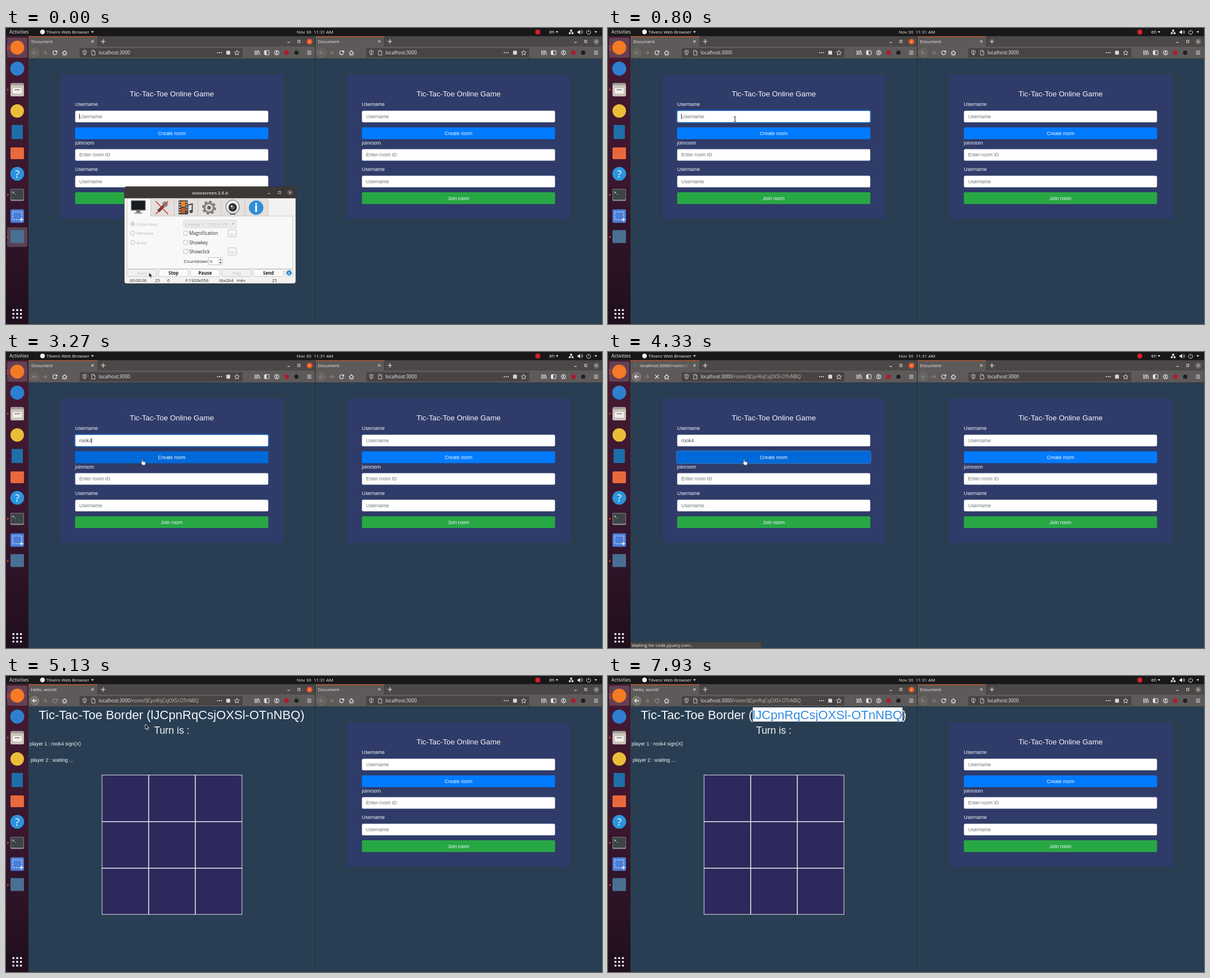
Recreate the animation shown at these times as an HTML page. Size 1061 by 528 pixels, loop 8000 ms.

```html
<!DOCTYPE html>
<html lang="en">
<head>
<meta charset="utf-8">
<title>Online game demo</title>
<style>
  html, body { margin: 0; width: 1061px; height: 528px; overflow: hidden; background: #293e52; }
  svg { display: block; }
  text { font-family: "Open Sans", "Noto Sans", sans-serif; white-space: pre; }
  .web { font-family: "Liberation Sans", Arial, sans-serif; }
  .mid { text-anchor: middle; }
  .bold { font-weight: 700; }
</style>
</head>
<body>
<svg id="stage" width="1061" height="528" viewBox="0 0 1061 528"></svg>
<script>
const LOOP = 8000;
const USER = 'rook4';
const ROOM = 'lJCpnRqCsjOXSl-OTnNBQ';
const HEAD = 'Tic-Tac-Toe Border (';
const PAGE = '#293e52', BAR = '#5d5a59', FG = '#f1f0ef';

// Drawing helpers
const rect = (x, y, w, h, fill, r = 0, more = '') =>
  `<rect x="${x}" y="${y}" width="${w}" height="${h}" rx="${r}" fill="${fill}" ${more}/>`;
const dot = (x, y, r, fill, more = '') => `<circle cx="${x}" cy="${y}" r="${r}" fill="${fill}" ${more}/>`;
const line = (d, color = FG, w = 1, fill = 'none') =>
  `<path d="${d}" stroke="${color}" stroke-width="${w}" fill="${fill}"/>`;
const shape = (d, fill = FG) => `<path d="${d}" fill="${fill}"/>`;
const text = (x, y, s, size, fill = FG, cls = '') =>
  `<text x="${x}" y="${y}" font-size="${size}" fill="${fill}" class="${cls}">${s}</text>`;
const group = (id, body, more = '') => `<g id="${id}" ${more}>${body}</g>`;
const cross = (x, y, r, color = FG, w = 1) =>
  line(`M${x - r} ${y - r}l${2 * r} ${2 * r}m0 ${-2 * r}l${-2 * r} ${2 * r}`, color, w);
const caretDown = (x, y, color = FG) => shape(`M${x - 2.4} ${y - 1.2}h4.8l-2.4 3z`, color);

function topBar() {
  return rect(0, 0, 1061, 14.5, '#191818')
    + text(6, 10.2, 'Activities', 8.4)
    + dot(65, 7, 4.2, FG)
    + text(72, 10.2, 'Tilvero Web Browser', 8)
    + caretDown(154, 7)
    + text(550, 10.2, 'Nov 30&#160; 11:31 AM', 8, FG, 'mid')
    + dot(946.7, 7.2, 4.6, '#d3202c')
    + text(967, 10.2, 'en', 8.2) + caretDown(981, 7)
    + rect(1004.5, 3, 3.2, 3, FG) + rect(1002, 8, 3.2, 3, FG) + rect(1007, 8, 3.2, 3, FG)
    + line('M1006 6v1.2M1003.6 8.3v-1.2h5v1.2', FG, .7)
    + shape('M1017.5 5.7h2l2.5-2.4v8l-2.5-2.4h-2z')
    + line('M1023.4 5a3 3 0 0 1 0 4.4M1025 3.6a5 5 0 0 1 0 7.2', FG, .8)
    + line('M1035.2 4.6a3.6 3.6 0 1 0 3.8 0M1037.1 3v4', FG, 1)
    + caretDown(1050, 7);
}

function dock() {
  const apps = [0, 1, 2].map(r => [0, 1, 2].map(c => dot(13.2 + c * 6.7, 503.2 + r * 6.7, 1.9, '#f4f0f2')).join('')).join('');
  const marks = [33, 38, 110, 297.5, 373].map(y => dot(3.2, y, 1.4, '#e95420')).join('');
  return rect(0, 14.5, 40, 513.5, 'url(#dockShade)')
    + rect(2, 17, 36, 36, '#ffffff', 3, 'opacity=".17"')
    + group('dockActive', rect(2, 355.5, 36, 35, '#ffffff', 3, 'opacity=".2"'))
    + dot(20, 35, 12.5, '#f57a25')
    + dot(20, 72.5, 12.5, '#2f7fd0')
    + rect(8, 98, 24, 24, '#a39d95', 3) + rect(8, 102, 24, 20, '#c9c4bc', 3)
    + rect(12, 107, 16, 10, '#f2f0ed', 1.5) + rect(15, 109, 10, 2.2, '#a39d95', 1)
    + dot(20, 148, 12, '#e9bd3a')
    + rect(10, 173, 20, 25, '#1d6fa8', 1)
    + rect(8, 213, 24, 21, '#e8693c', 2)
    + dot(20, 260, 12.3, '#2c94dc') + text(20, 267, '?', 19, '#ffffff', 'mid')
    + rect(8, 287, 24, 21.5, '#8e9090', 2) + rect(8.8, 287.8, 22.4, 18.5, '#3c4446', 1.5)
    + text(11, 296, '&gt;_', 7, '#ffffff', 'bold')
    + rect(8, 323.5, 24, 24, '#4a7fd8', 2.5)
    + '<rect x="12" y="328" width="16" height="14" fill="none" stroke="#fff" stroke-dasharray="2.4 1.8"/>'
    + line('M27.5 339v6M24.5 342h6', '#ffffff', 1.3)
    + rect(8, 360.5, 24, 23, '#496f93', 1)
    + marks + apps;
}

// Browser frame at the left; the right window is a shifted copy
function chrome(left) {
  const pre = left ? 'L' : 'R';
  const reload = line('M89.8 41.7a3.6 3.6 0 1 0 .8 3.2', FG, 1.2) + shape('M91.4 39.8v3.8h-3.8z');
  return rect(40, 14.5, 510.2, 19, '#4b4847')
    + rect(40, 14.5, 123, 19, BAR) + rect(40, 14.5, 123, 1.4, '#d95b2c')
    + line('M163.3 16v17', '#3a3837', .8)
    + rect(40, 33, 510.2, 21.5, BAR) + rect(40, 54, 510.2, .8, '#353b42')
    + group(pre + 'doc', text(45, 27, 'Document', 7.8))
    + cross(154, 24, 2.2) + line('M169 24h8M173 20v8', FG, 1.1)
    + line('M501 25.7h4.5', FG, 1) + '<rect x="519.5" y="22" width="4" height="4" fill="none" stroke="#f1f0ef" stroke-width=".9"/>'
    + dot(540.3, 24.3, 5.2, left ? '#e95420' : '#6d6a68') + cross(540.3, 24.3, 1.8, FG, .9)
    + group(pre + 'backOff', dot(51, 44, 8, '#656260', 'stroke="#75726f" stroke-width=".7"') + line('M55 44h-7.5M50.8 40.7l-3.3 3.3l3.3 3.3', '#8e8b89', 1.2))
    + line('M65 44h7.5M69.2 40.7l3.3 3.3l-3.3 3.3', '#8b8886', 1.2)
    + group(pre + 'reload', reload)
    + line('M100.2 44.4l4.2-4l4.2 4M101.6 43.6v4.4h5.6v-4.4M104.4 48v-2.6', FG, 1.1)
    + rect(131, 36, 290, 16.5, '#474443', 2)
    + line('M136.7 41l3.2-1.2l3.2 1.2c0 4-1 6-3.2 7.3c-2.2-1.3-3.2-3.3-3.2-7.3zM139.9 40v8', '#dad8d6', .9)
    + line('M152.6 40h3.7l2.2 2.2v6h-5.9zM156.2 40v2.3h2.2', '#dad8d6', .9)
    + text(165, 47.2, 'localhost:3000', 8.3)
    + [376.6, 380, 383.4].map(x => dot(x, 44, 1, FG)).join('')
    + rect(392.2, 40.6, 6.8, 6.8, '#dad8d6', 1)
    + line('M411 39.8l1.3 2.8l3 .4l-2.2 2.1l.6 3l-2.7-1.5l-2.7 1.5l.6-3l-2.2-2.1l3-.4z', FG, .9)
    + line('M443.2 40v8M445.7 40v8M448.2 40v8M449.6 40.3l2.4 7.6', FG, 1.1)
    + '<rect x="460" y="40.3" width="8.4" height="7.4" rx="1" fill="none" stroke="#f1f0ef"/>' + rect(460.6, 41, 3, 6, FG)
    + dot(482, 44, 4, 'none', 'stroke="#f1f0ef"') + dot(482, 42.9, 1.4, FG) + line('M479.5 46.6q2.5-2.4 5 0', FG, 1)
    + dot(499.5, 44, 4, '#b3182b')
    + dot(517, 44, 3.8, '#1f1e1e')
    + line('M536.2 41.2h7.4M536.2 44h7.4M536.2 46.8h7.4', FG, 1.1);
}

const field = (y, hint) =>
  rect(123.3, y + .3, 343.4, 20.4, '#ffffff', 2.2, 'stroke="#ced4da" stroke-width=".5"')
  + text(130.5, y + 13.3, hint, 8.84, '#6c757d', 'web');
const button = (y, label, fill) =>
  rect(123, y, 344, 21, fill, 2.2) + text(295, y + 13.5, label, 8.84, '#f5f8ff', 'web mid');
const label = (y, s) => text(123, y, s, 8.84, '#f4f6fa', 'web');

function form(hint) {
  return rect(97, 83, 396.5, 257.5, '#2f3b69')
    + text(295.2, 121.7, 'Tic-Tac-Toe Online Game', 13.26, '#f6f7fb', 'web mid')
    + label(139.2, 'Username') + field(147.4, hint)
    + button(177.2, 'Create room', '#007bff')
    + label(207.6, 'joinroom') + field(215.9, 'Enter room ID')
    + label(255.2, 'Username') + field(263.4, 'Username')
    + button(293, 'Join room', '#28a745');
}

function leftForm() {
  const typed = [...USER].map((_, i) =>
    group('typed' + (i + 1), text(130.5, 160.7, USER.slice(0, i + 1), 8.84, '#495057', 'web'))).join('');
  const ring = (id, y, color) =>
    group(id, `<rect x="122.3" y="${y}" width="345.4" height="22.4" rx="3" fill="none" stroke="${color}" stroke-width="1.9"/>`);
  return form('') + ring('inputRing', 146.7, '#1d62b4')
    + group('typed0', text(130.5, 160.7, 'Username', 8.84, '#6c757d', 'web')) + typed
    + group('caret', rect(130.3, 152.8, .8, 10, '#222'))
    + group('hover', button(177.2, 'Create room', '#0069d9'))
    + ring('buttonRing', 176.5, '#2c6cb6');
}

function board() {
  const x0 = 171, y0 = 176.7, size = 249, third = 83;
  const lines = [1, 2].map(i =>
    `M${x0 + i * third} ${y0}v${size - .5}M${x0} ${y0 + i * third}h${size}`).join('');
  const title = fill => `<text x="58.3" y="77.2" font-size="22.1" fill="${fill}" class="web">${HEAD}${ROOM})</text>`;
  return rect(40, 54.8, 510.2, 473.2, PAGE)
    + title('#f4f6f8')
    + `<g clip-path="url(#selection)">${rect(200, 56, 340, 25.5, '#ffffff')}${title('#338be0')}</g>`
    + text(295, 103.4, 'Turn is :', 17.7, '#f4f6f8', 'web mid')
    + text(42, 124.2, `player 1 : ${USER} sign(X)`, 8.84, '#f4f6f8', 'web')
    + text(44, 152.9, 'player 2 : waiting ...', 8.84, '#f4f6f8', 'web')
    + rect(x0, y0, size, size - .5, '#2d295c', 0, 'stroke="#e4e5ee" stroke-width="1"')
    + line(lines, '#eeeef5', 1.5);
}

function recorder() {
  const INK = '#2e2d2c', OFF = '#b9b6b2';
  const radio = (y, s, on) => dot(225.5, y, 3.8, '#f4f3f2', `stroke="${OFF}" stroke-width=".8"`)
    + (on ? dot(225.5, y, 1.8, OFF) : '') + text(232.5, y + 3, s, 8, OFF);
  const check = (y, s) => rect(316.4, y - 3.6, 7.2, 7.2, '#fff', 1, 'stroke="#aaa6a1" stroke-width=".8"')
    + text(326.3, y + 3, s, 8.1, INK);
  const more = y => rect(395.5, y - 6.5, 14.5, 13, '#f7f6f5', 1.5, 'stroke="#b7b3ae" stroke-width=".8"')
    + text(402.8, y + 2.5, '...', 8, INK, 'mid');
  const push = (x, s, on) => rect(x, 430.5, 52.5, 12.8, on ? '#fbfafa' : '#f1f0ef', 2, 'stroke="#c3bfba" stroke-width=".8"')
    + text(x + 26.2, 439.8, s, 8, on ? '#1d1c1c' : '#c2bfbb', on ? 'mid bold' : 'mid');
  const info = (x, y, r) => dot(x, y, r, '#2c8fdb', 'stroke="#1c6cae" stroke-width=".6"')
    + text(x, y + r * .62, 'i', r * 1.7, '#fff', 'mid bold');
  const tabs = [0, 1, 2, 3, 4, 5].map(i =>
    rect(215.8 + i * 41.9, i ? 305.5 : 304.3, 41.9, i ? 30 : 31.5, i ? '#e3e0dd' : '#f9f8f8', 1.5, 'stroke="#c9c5c1" stroke-width=".7"')).join('');
  const teeth = `<circle cx="361.5" cy="320.5" r="10.6" fill="none" stroke="#6f6f6f" stroke-width="3.4" stroke-dasharray="4.2 4.1"/>`;
  const film = [0, 1, 2, 3, 4].map(i => rect(308.3, 309.5 + i * 4.5, 2, 2.4, '#eee') + rect(320.8, 309.5 + i * 4.5, 2, 2.4, '#eee')).join('');
  const status = [[220, '00:00:00'], [265, '25'], [287, '0'], [319.5, 'F:1920x956'], [379, 'libx264'], [411, 'mkv'], [473.5, '25']]
    .map(([x, s]) => text(x, 453, s, 7.7, INK)).join('');
  return rect(210.5, 283, 305.5, 173, '#f3f2f1', 4, 'stroke="#2b2a29" stroke-width=".8"')
    + shape('M210.5 303.7v-16q0-4.7 4.7-4.7h296q4.8 0 4.8 4.7v16z', '#3b3836')
    + text(363, 296.8, 'vokoscreen 2.5.0', 7.8, '#c9c6c2', 'mid bold')
    + line('M466 295.3h4', '#d5d2ce', 1) + '<rect x="485" y="291.5" width="4" height="4" fill="none" stroke="#d5d2ce" stroke-width=".8"/>'
    + dot(505.5, 293.4, 5, '#575452') + cross(505.5, 293.4, 1.8, FG, .9)
    + tabs + rect(215.8, 335.5, 294.7, 94, '#f9f8f8', 0, 'stroke="#c9c5c1" stroke-width=".8"')
    + rect(217, 334, 39.8, 3, '#f9f8f8')
    // tab icons
    + rect(222.5, 307.5, 26, 18, '#55585b', 1) + rect(223.8, 308.8, 23.4, 15, '#191c1f') + rect(232, 325.5, 7, 4, '#77797b') + rect(228.5, 329, 14, 2.3, '#989a9b', 1)
    + line('M271 327l10-10', '#34373a', 5) + dot(283, 314.5, 5, '#888b8e') + line('M266.5 309l22 23M288.5 309l-22 23', '#d8342c', 1.7)
    + rect(307.3, 307.5, 16.5, 25, '#3b3b3b', 1) + rect(311.5, 309, 8, 10, '#e58a2a') + rect(311.5, 320.5, 8, 10, '#c85c23') + film
    + line('M323.5 329v-13l8-2.3v13', '#4a4a4a', 2) + dot(321.6, 329.5, 2.9, '#4a4a4a') + dot(329.6, 327.3, 2.9, '#4a4a4a')
    + teeth + dot(361.5, 320.5, 10, '#858585') + dot(361.5, 320.5, 6.6, '#d8d8d8') + dot(361.5, 320.5, 3.2, '#626262')
    + shape('M397 333q6.5-5 13 0z', '#55585b') + dot(403.5, 319, 12, '#ededed', 'stroke="#777" stroke-width="1.2"') + dot(403.5, 320, 7.4, '#2c2e31') + dot(403.5, 320, 3.4, '#61676d') + dot(401.7, 318, 1.4, '#fff')
    + info(445.3, 320.5, 12.5)
    // options
    + radio(349.5, 'Fullscreen', true) + radio(366, 'Window') + radio(382.5, 'Area')
    + rect(316.3, 343.2, 93.5, 13, '#eeedeb', 1.5, 'stroke="#cfccc8" stroke-width=".8"')
    + text(319, 352.6, 'Display 1:&#160; 1920 x 957', 7.7, OFF) + caretDown(404, 349.5, OFF)
    + check(366, 'Magnification') + more(366) + check(382.5, 'Showkey') + check(398.5, 'Showclick') + more(398.5)
    + text(316.3, 419.2, 'Countdown', 8, INK)
    + rect(360.5, 409.5, 25, 13, '#fff', 1.5, 'stroke="#b7b3ae" stroke-width=".8"') + text(362.7, 419.2, '0', 8, INK)
    + line('M377.5 409.5v13M377.5 416h8', '#c5c1bd', .7) + caretDown(381.6, 419, '#555') + shape('M379.6 414.2h4l-2-2.6z', '#555')
    + push(215.8, 'Start', false) + push(272, 'Stop', true) + push(328.3, 'Pause', true) + push(384.7, 'Play', false) + push(441, 'Send', true)
    + rect(497.5, 430.5, 13, 12.8, '#fbfafa', 2, 'stroke="#c3bfba" stroke-width=".8"') + info(504, 436.8, 4.4)
    + status;
}

function pointer() {
  const bar = 'M-2-4.5h1.4l.6.6l.6-.6h1.4M0-4v8M-2 4.5h1.4l.6-.6l.6.6h1.4';
  return group('cursor',
    group('arrow', '<path d="M0 0v9l2.1-1.9l1.5 3.3l1.5-.7l-1.5-3.2h2.8z" fill="#111" stroke="#fff" stroke-width=".8"/>')
    + group('beam', line(bar, '#e8e8e8', 1.9) + line(bar, '#1c1c1c', .9))
    + group('hand', '<path d="M-1.2-.5q1.1-1 2 0v3.3l4 .8q1 .4.8 1.6l-.7 4h-5l-3.2-3.8q.3-1.4 2.1 0z" fill="#fff" stroke="#222" stroke-width=".7"/>'));
}

const stage = document.getElementById('stage');
stage.innerHTML =
  `<defs><linearGradient id="dockShade" x1="0" y1="0" x2="0" y2="1">
     <stop offset="0" stop-color="#451a30"/><stop offset=".5" stop-color="#3a1730"/><stop offset="1" stop-color="#1f0f1c"/>
   </linearGradient>
   <clipPath id="selection"><rect id="selBox" x="257.8" y="56" width="0" height="25.5"/></clipPath></defs>`
  + rect(0, 0, 1061, 528, PAGE)
  + leftForm()
  + group('game', board())
  + chrome(true)
  + group('backOn', dot(51, 44, 8, '#777472', 'stroke="#918e8b" stroke-width=".7"') + line('M55 44h-7.5M50.8 40.7l-3.3 3.3l3.3 3.3', FG, 1.3))
  + group('stop', cross(87, 44, 3.3, FG, 1.2))
  + group('path', text(221, 47.2, '/room/' + ROOM, 8.3, '#c4c1bf'))
  + group('loadTab', line('M45.5 24h4', '#3f97e8', 1.2)
      + text(57, 27, 'localhost:3000/room/lJC', 7.8) + rect(134, 17, 13, 15, BAR, 0, 'opacity=".6"') + rect(147, 17, 15.5, 16, BAR) + cross(154, 24, 2.2))
  + group('gameTab', text(44.5, 27, 'Hello, world!', 7.8))
  + group('status', rect(40, 517, 233.5, 11, '#4a4745', 0, 'stroke="#2e2c2b" stroke-width=".6"') + text(42, 525.6, 'Waiting for code.jquery.com…', 8))
  + `<g transform="translate(510.5 0)">${form('Username')}${chrome(false)}</g>`
  + rect(550, 14.5, 1, 513.5, '#22303d')
  + topBar() + dock()
  + group('recorder', recorder())
  + pointer();

// Motion: tables of [time, value]
const el = id => document.getElementById(id);
function play(id, prop, steps, easing = 'steps(1, end)') {
  const all = [...steps, [LOOP, steps[steps.length - 1][1]]];
  el(id).animate(all.map(([t, v]) => ({ offset: t / LOOP, [prop]: v, easing })), { duration: LOOP, iterations: Infinity });
}
function show(id, from, to = LOOP) {
  const steps = [[0, from ? 0 : 1]];
  if (from) steps.push([from, 1]);
  if (to < LOOP) steps.push([to, 0]);
  play(id, 'opacity', steps);
}

const FOCUS = 740, CLICK = 3440, LOAD = 3640, READY = 4520;
const keys = [0, 1480, 1640, 1800, 1960, 2280, LOOP];

const shrink = (x, y, s) => `translate(${x}px, ${y}px) scale(${s}) translate(-363px, -370px)`;
play('recorder', 'transform', [[0, shrink(363, 370, 1)], [120, shrink(363, 370, 1)], [360, shrink(20, 373, .09)]], 'ease-in');
play('recorder', 'opacity', [[0, 1], [120, 1], [360, 0]], 'ease-in');
show('dockActive', 0, 320);

show('inputRing', FOCUS, CLICK);
keys.slice(0, -1).forEach((t, i) => show('typed' + i, t, keys[i + 1]));
play('caret', 'transform', keys.slice(0, -1).map((t, i) =>
  [t, `translate(${i ? el('typed' + i).firstChild.getComputedTextLength() : 0}px, 0px)`]));
show('caret', 0, CLICK);
play('hover', 'opacity', [[0, 0], [2900, 0], [3050, 1]], 'linear');
show('buttonRing', CLICK);

show('Ldoc', 0, LOAD);
show('loadTab', LOAD, READY);
show('gameTab', READY);
show('LbackOff', 0, LOAD);
show('backOn', LOAD);
play('Lreload', 'opacity', [[0, 1], [LOAD, 0], [READY, .35]]);
show('stop', LOAD, READY);
show('path', LOAD);
show('status', LOAD + 80, READY);
show('game', READY);

// The selection grows letter by letter
const title = document.querySelector('#game text');
const edge = n => title.getSubStringLength(HEAD.length, n) + 'px';
const picks = [[5640, 1], [5720, 3], [5800, 5], [5900, 7], [6020, 8], [6120, 10], [6220, 11], [6320, 12],
  [6400, 14], [6460, 16], [6530, 18], [6600, 19], [6680, 20], [6760, 21]];
play('selBox', 'width', [[0, '0px'], ...picks.map(([t, n]) => [t, edge(n)])]);

const route = [[0, 254.5, 436], [160, 254.5, 436], [420, 250, 330], [720, 226, 163], [2560, 226, 163], [2980, 243, 192.5],
  [4560, 242.5, 192.5], [4980, 248, 86], [5160, 248, 86], [5420, 258, 71], [5560, 258, 70], [6000, 350, 67],
  [6370, 447, 66], [6720, 535, 68], [7050, 527, 69]];
play('cursor', 'transform', route.map(([t, x, y]) => [t, `translate(${x}px, ${y}px)`]), 'linear');
play('arrow', 'opacity', [[0, 1], [700, 0], [READY, 1], [5260, 0]]);
play('beam', 'opacity', [[0, 0], [700, 1], [2860, 0], [5260, 1]]);
show('hand', 2860, READY);
</script>
</body>
</html>
```
